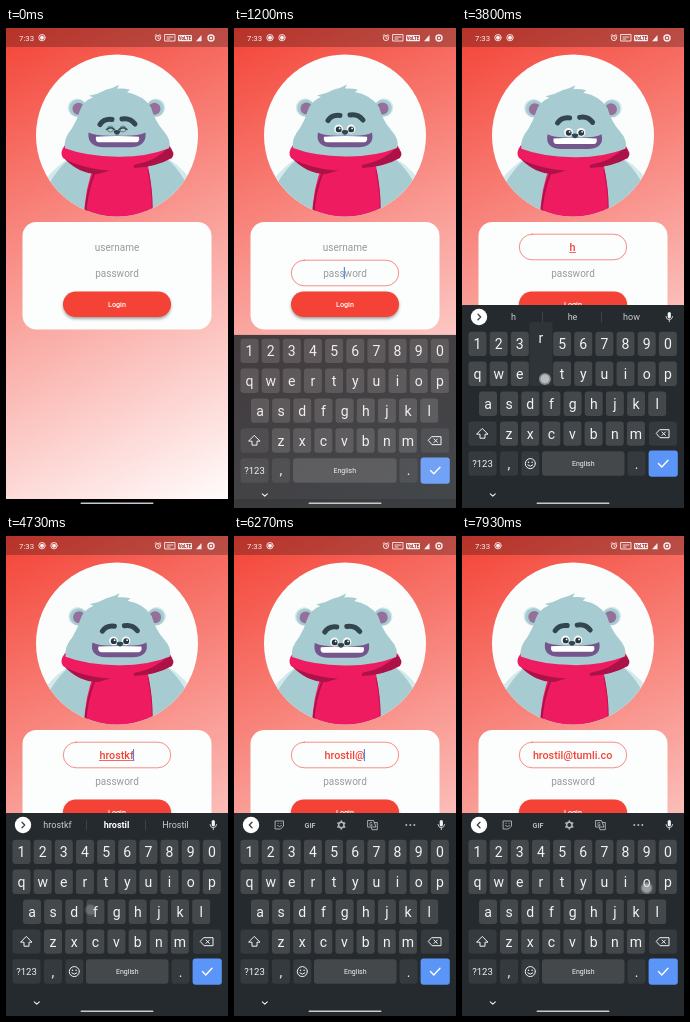
An HTML page with a canvas for the animation above (8000 ms loop, 222x480 px).

```html
<!DOCTYPE html>
<html lang="en">
<head>
<meta charset="utf-8">
<title>Login bear</title>
<style>
  html, body { margin: 0; width: 100%; height: 100%; overflow: hidden; }
  canvas { display: block; width: 222px; height: 480px; }
</style>
</head>
<body>
<canvas id="stage"></canvas>
<script>
const canvas = document.getElementById('stage');
const ctx = canvas.getContext('2d');
const ratio = window.devicePixelRatio || 1;
canvas.width = 222 * ratio;
canvas.height = 480 * ratio;

const LOOP = 8000, RED = '#f44336', INK = '#33454f', LIGHT = '#f1f3f4';
const FUR = '#a6cbd0', SCARF = '#ef1b60', SCARF_DARK = '#ac1148';
const NAME = 'hrostil', CAPITAL = 'Hrostil';
const PASSWORD_TAP = 1000, USERNAME_TAP = 2000, SUGGESTION_TAP = 5000;

// [release time, key, touch offset x, y]
const presses = [
  [3250, 'h', 0, 2], [3850, 'r', 4, 5], [4000, 'o', 0, 3], [4160, 's', 2, 3],
  [4320, 't', 0, 3], [4480, 'k', 1, 3], [4640, 'f', -5, -2],
  [5400, '?123', 0, 0], [5780, '@', 0, 3], [5990, 'ABC', 0, 0],
  [6520, 't', 0, 4], [6720, 'u', 0, 4], [6920, 'm', 0, 2], [7120, 'l', 0, 2],
  [7320, 'i', 0, 4], [7520, '.', 0, 2], [7710, 'c', 0, 2], [7900, 'o', 0, 6]
];

const layouts = {
  letters: ['1234567890', 'qwertyuiop', 'asdfghjkl', 'zxcvbnm'],
  symbols: ['1234567890', '@#$_&-+()/', '*"\':;!?~|', '<>[]{}=']
};

const clamp = v => Math.max(0, Math.min(1, v));
const smooth = v => { v = clamp(v); return v * v * (3 - 2 * v); };

function keyed(t, points) {
  for (let i = 1; i < points.length; i++) {
    const [t0, v0] = points[i - 1], [t1, v1] = points[i];
    if (t < t1) return v0 + (v1 - v0) * smooth((t - t0) / (t1 - t0));
  }
  return points[points.length - 1][1];
}

function box(x, y, w, h, r, color) {
  ctx.beginPath();
  ctx.roundRect(x, y, w, h, r);
  ctx.fillStyle = color;
  ctx.fill();
}

function disc(x, y, r, color) {
  ctx.beginPath();
  ctx.arc(x, y, r, 0, Math.PI * 2);
  ctx.fillStyle = color;
  ctx.fill();
}

function fill(d, color) {
  ctx.fillStyle = color;
  ctx.fill(new Path2D(d));
}

function line(d, color, width = 1) {
  ctx.strokeStyle = color;
  ctx.lineWidth = width;
  ctx.lineCap = ctx.lineJoin = 'round';
  ctx.stroke(new Path2D(d));
}

function ring(x, y, r, color, width = 1) {
  ctx.beginPath();
  ctx.arc(x, y, r, 0, Math.PI * 2);
  ctx.strokeStyle = color;
  ctx.lineWidth = width;
  ctx.stroke();
}

function label(text, x, y, size, color, weight = 400, align = 'center') {
  ctx.font = `${weight} ${size}px Roboto, sans-serif`;
  ctx.textAlign = align;
  ctx.textBaseline = 'alphabetic';
  ctx.fillStyle = color;
  ctx.fillText(text, x, y);
}

function typedText(t) {
  let text = '';
  for (const [time, key] of presses) {
    if (time > t) break;
    if (time > SUGGESTION_TAP && !text.includes('@')) text = NAME;
    if (key.length === 1) text += key;
  }
  return t >= SUGGESTION_TAP && !text.includes('@') ? NAME : text;
}

function drawBackground() {
  const g = ctx.createLinearGradient(0, 0, 222, 480);
  g.addColorStop(0, RED);
  g.addColorStop(1, '#ffffff');
  ctx.fillStyle = g;
  ctx.fillRect(0, 0, 222, 480);
  ctx.fillStyle = 'rgba(0,0,0,.25)';
  ctx.fillRect(0, 0, 222, 19);
  ctx.fillStyle = '#000';
  ctx.fillRect(0, 471, 222, 9);
}

function drawStatus(t) {
  const white = '#f6eeee';
  label('7:33', 13, 12.7, 7.8, white, 400, 'left');
  const blink = t % 2000;
  const dots = blink > 400 && blink < 1870 ? [36, 48] : [36];
  for (const x of dots) {
    ring(x, 9.7, 3.2, white, .9);
    disc(x, 9.7, 2, white);
  }
  ring(152, 10, 2.6, white, .9);
  line('M152 8.5V10.2L153.2 10.8M149 7.5L150.3 6.5M155 7.5L153.7 6.5', white, .8);
  line('M159 6.5H169V13H159Z', white, .9);
  line('M161 9H167M161 11H164', white, .9);
  box(172, 7, 14, 6.2, 1, white);
  label('VoLTE', 179, 11.8, 4.5, '#9c302b', 700);
  fill('M190 13.2L195.5 7V13.2Z', white);
  ring(205, 10, 3, white, 1.4);
  disc(205, 10, 1.2, white);
}

function drawEye(x, y, laugh) {
  if (laugh > .5) {
    ring(x, y, 3, '#64818b', 1);
    line(`M${x - 4} ${y + .5}Q${x} ${y - 3} ${x + 4} ${y + .5}`, INK, 1.5);
    return;
  }
  ctx.save();
  ctx.translate(x, y);
  ctx.scale(1, 1 - laugh * 1.4);
  disc(0, 0, 4.4, '#f7fbfb');
  disc(.2, .4, 2.9, '#273740');
  disc(1.1, -.6, .9, '#fff');
  ctx.restore();
}

function drawFace(laugh, lookX, lookY) {
  ctx.save();
  ctx.translate(lookX * .8, lookY * .7);
  const brow = laugh * 4;
  line(`M94 ${92.5 + brow}Q98 ${86.5 + brow} 106 ${87.5 + brow}`, INK, 5);
  line(`M116 ${87 + brow}Q124 ${85.5 + brow} 129 ${92 + brow}`, INK, 5);
  ctx.restore();

  const w = laugh * 1.5;
  ctx.save();
  ctx.translate(lookX * .8, lookY * .5);
  fill(`M${84 - w} 104.5Q92 108.5 111 107.5Q131 108.5 ${138 + w} 104.5Q141 119 124 119.3H98Q81 119 ${84 - w} 104.5Z`, '#74568d');
  fill('M90 108.7Q111 107.5 133 108.7Q134 114 130 114.3H93Q89 114 90 108.7Z', '#fdfefe');
  ctx.restore();

  ctx.save();
  ctx.translate(lookX, lookY);
  drawEye(104.5, 101, laugh);
  drawEye(117, 101, laugh);
  fill('M107.5 103Q111 101 114.5 103Q113.5 106.8 111 106.8Q108.5 106.8 107.5 103Z', INK);
  ctx.restore();
}

function drawBear(t) {
  const laugh = keyed(t, [[0, 1], [450, 1], [800, 0]]);
  const lookX = keyed(t, [[0, 0], [3250, 0], [3700, 2], [4730, 3], [5500, 0], [6200, -4], [6500, -4], [7930, -1]]);
  const lookY = keyed(t, [[0, 0], [2000, 0], [2350, 3], [5600, 4], [6200, 5], [7930, 3]]);

  ctx.save();
  disc(111, 107.5, 81, '#fbfdfd');
  ctx.clip();

  fill('M26 174Q40 145 60 132H164Q183 143 197 174V192H26Z', '#d3e9ec');
  fill('M33 178Q43 149 62 132H162Q179 146 190 178V192H33Z', FUR);
  fill('M88 138H142Q147 165 146 190H78Q79 160 88 138Z', SCARF);
  line('M88 146Q80 166 79 190', SCARF_DARK, 2);
  line('M142 142Q147 165 146 190', '#c9144f', 1.2);
  fill('M57 129Q72 146 92 146L106 142Q80 140 57 129Z', SCARF_DARK);
  fill('M59 117Q53 125 57 130Q76 141 108 143Q146 141 166 129Q168 123 163 117Z', SCARF);
  fill('M128 137Q150 133 163 119Q170 125 166 130Q150 139 128 140Z', SCARF_DARK);

  ctx.save();
  ctx.translate(lookX * .2, (lookY + laugh) * .2);
  for (const [x, side] of [[71, 1], [150, -1]]) {
    disc(x, 79.5, 9.3, '#d3e9ec');
    disc(x + side * .8, 80, 8.6, FUR);
    disc(x + 1.5 * side, 80.5, 6, '#94709a');
  }
  fill('M59 120Q57 111 66 100Q71 92 74 82Q77 73 87 69L83 67.5Q92 66 100 61.5' +
    'Q107 60 113 56.5L111 60.5Q118 60 124 61.5L121 64Q137 67 145 79' +
    'Q149 93 157 102Q166 112 163 120Q140 129 111 128.5Q80 128 59 120Z', FUR);
  ctx.restore();

  drawFace(laugh, lookX, lookY);
  ctx.restore();
}

function drawField(hint, text, y, focused, lastEdit, t) {
  if (focused) {
    ctx.beginPath();
    ctx.roundRect(57.3, y - 12.8, 107.4, 25.6, 12.8);
    ctx.strokeStyle = 'rgba(244,67,54,.8)';
    ctx.lineWidth = .75;
    ctx.stroke();
  }
  if (text) label(text, 110.6, y + 3.8, 10.8, RED, 500);
  else label(hint, 111, y + 3.6, 10, '#999999');

  const half = text ? ctx.measureText(text).width / 2 : 0;
  if (text && t < SUGGESTION_TAP) line(`M${110.6 - half} ${y + 5.5}H${110.6 + half}`, RED, .8);
  if (focused && (t - lastEdit) % 1000 < 500 && text.length < 16) {
    ctx.fillStyle = '#4285f4';
    ctx.fillRect(109.8 + half, y - 6, 1.1, 12);
  }
}

function drawCard(t) {
  const text = typedText(t);
  const done = presses.filter(p => p[0] <= t && p[1].length === 1);
  const lastEdit = done.length ? done[done.length - 1][0] : USERNAME_TAP;
  box(16.5, 194, 189, 107.5, 14, '#fcfdfd');
  drawField('username', text, 219, t >= USERNAME_TAP, lastEdit, t);
  drawField('password', '', 245, t >= PASSWORD_TAP && t < USERNAME_TAP, PASSWORD_TAP, t);
  ctx.save();
  ctx.shadowColor = 'rgba(0,0,0,.35)';
  ctx.shadowBlur = 3 * ratio;
  ctx.shadowOffsetY = 2 * ratio;
  box(57, 263.5, 108, 25.5, 12.75, RED);
  ctx.restore();
  label('Login', 111, 278.8, 7.2, '#fff', 500);
}

const rowY = row => 316 + row * 29.9;

function keyCentre(key, layout) {
  if (key === '?123' || key === 'ABC') return [20, rowY(4)];
  if (key === '.') return [174.5, rowY(4)];
  const rows = layouts[layout];
  const row = rows.findIndex(r => r.includes(key));
  const start = [15.5, 15.5, 26, 47][row];
  return [start + rows[row].indexOf(key) * 21.15, rowY(row)];
}

function drawKey(x, y, width, text, size = 14, color = '#44484b') {
  box(x - width / 2, y - 12.3, width, 24.4, 3, color);
  label(text, x, y + size * .35, size, LIGHT);
}

function drawToolbar(text, t) {
  const suggesting = text && t < SUGGESTION_TAP;
  disc(17, 289, 8.2, '#fff');
  line(suggesting ? 'M16 286.3L18.7 289L16 291.7' : 'M18 286.3L15.3 289L18 291.7', '#3c4043', 1.3);
  box(205.7, 284, 3.2, 6.4, 1.6, LIGHT);
  line('M204 288.5Q204.3 291.7 207.3 291.7Q210.3 291.7 210.6 288.5M207.3 291.7V293.7', LIGHT, .8);

  if (suggesting) {
    const short = text.length < 2;
    const words = short ? [text, 'he', 'how'] : [text, NAME, CAPITAL];
    words.forEach((word, i) => {
      const strong = i === 1 && !short;
      label(word, 51.5 + i * 59, 292, 9, strong ? '#fff' : '#c9ccd0', strong ? 700 : 400);
    });
    line('M80.5 284V294M139.5 284V294', '#4a4e52', .7);
    return;
  }
  const icon = '#b4b9bd';
  line('M41.5 285H49.5V290L46.5 293H41.5ZM43.5 289.3Q45.5 292 47.5 289.3M44 287.3H44.2M47 287.3H47.2', icon, .9);
  label('GIF', 76, 291.7, 7.2, icon, 700);
  ring(107.3, 289, 2.7, icon, 1.5);
  for (let i = 0; i < 6; i++) {
    const a = i * Math.PI / 3 + Math.PI / 6;
    disc(107.3 + Math.cos(a) * 3.8, 289 + Math.sin(a) * 3.8, .9, icon);
  }
  line('M134 284.5H139.5L142 291H134Z', icon, .9);
  label('G', 137, 290, 5, icon, 700);
  line('M140.5 286.5H143.3V293.7H138L137.3 291.5', icon, .9);
  for (const x of [172.3, 176.3, 180.3]) disc(x, 289, 1, icon);
}

function drawKeyboard(t, layout) {
  const start = 1090;
  if (t < start) return;
  const shown = 1 - (1 - clamp((t - start) / 230)) ** 3;
  const password = t < USERNAME_TAP;
  const top = password ? 300 : 277;
  const slide = 50 * (1 - shown);
  const dark = '#353a3e';
  ctx.save();
  ctx.translate(0, slide);
  ctx.fillStyle = '#252a2e';
  ctx.fillRect(0, top, 222, 480 - top);
  if (!password) drawToolbar(typedText(t), t);

  layouts[layout].forEach(row => {
    for (const key of row) drawKey(...keyCentre(key, layout), 18, key);
  });
  const [third, last] = [rowY(3), rowY(4)];
  const symbols = layout === 'symbols';
  drawKey(20.5, third, 28, symbols ? '=\\<' : '', 9, dark);
  drawKey(201, third, 28, '', 9, dark);
  if (!symbols) line(`M20.5 ${third - 5}L26 ${third + .5}H23V${third + 4.5}H18V${third + .5}H15Z`, LIGHT, 1);
  line(`M198 ${third - 4}H207V${third + 4}H198L194.5 ${third}ZM200 ${third - 1.7}L203.4 ${third + 1.7}M203.4 ${third - 1.7}L200 ${third + 1.7}`, LIGHT, 1);

  drawKey(20.5, last, 28, symbols ? 'ABC' : '?123', 9.5, dark);
  drawKey(47, last, 18, ',', 14, dark);
  drawKey(174.5, last, 18, '.', 14, dark);
  const spaceLeft = password ? 59 : 80;
  drawKey((spaceLeft + 162.5) / 2, last, 162.5 - spaceLeft, 'English', 7);
  if (!password) {
    drawKey(68.3, last, 18, '', 9, dark);
    ring(68.3, last, 5, LIGHT, 1);
    disc(66.5, last - 1.4, .8, LIGHT);
    disc(70.1, last - 1.4, .8, LIGHT);
    line(`M65.8 ${last + 1.4}Q68.3 ${last + 4} 70.8 ${last + 1.4}`, LIGHT, 1);
  }
  box(186.6, last - 13, 29.2, 26.2, 3, '#5b95f7');
  line(`M196.5 ${last}L199.8 ${last + 3.3}L206 ${last - 3.3}`, '#fff', 1.4);
  ctx.restore();

  // The page shows through the whole sheet while it fades in.
  ctx.save();
  ctx.beginPath();
  ctx.rect(0, top + slide, 222, 480);
  ctx.clip();
  ctx.globalAlpha = 1 - shown;
  drawBackground();
  ctx.restore();
  line('M28.3 465.8L30.8 468.2L33.3 465.8', LIGHT, 1.1);
}

function drawTouch(x, y, age) {
  // Age counts from release; negative while the finger is down.
  if (age < -90 || age > 130) return;
  const alpha = age < 0 ? .8 : .7 * (1 - age / 130);
  disc(x, y, 6, `rgba(190,192,194,${alpha * .75})`);
  disc(x, y, 4.5, `rgba(225,226,227,${alpha * .7})`);
}

function drawTouches(t) {
  drawTouch(111, 247, t - PASSWORD_TAP);
  drawTouch(111, 221, t - USERNAME_TAP);
  drawTouch(110, 289, t - SUGGESTION_TAP);
  for (const [time, key, dx, dy] of presses) {
    const age = t - time;
    if (age < -90 || age > 130) continue;
    const [x, y] = keyCentre(key, key === '@' ? 'symbols' : 'letters');
    if (age < 0 && key.length === 1) {
      box(x - 11.5, y - 52, 23, 64, 3, '#2f3438');
      label(key, x, y - 31, 14, LIGHT);
    }
    drawTouch(x + dx, y + dy, age);
  }
}

function draw(now) {
  const t = now % LOOP;
  ctx.setTransform(ratio, 0, 0, ratio, 0, 0);
  drawBackground();
  drawStatus(t);
  drawBear(t);
  drawCard(t);
  drawKeyboard(t, t >= 5400 && t < 5990 ? 'symbols' : 'letters');
  drawTouches(t);
  box(74.5, 474.6, 73, 1.4, .7, '#c8cacb');
}

const begin = performance.now();
function tick() {
  draw(performance.now() - begin);
  requestAnimationFrame(tick);
}
tick();
</script>
</body>
</html>
```
